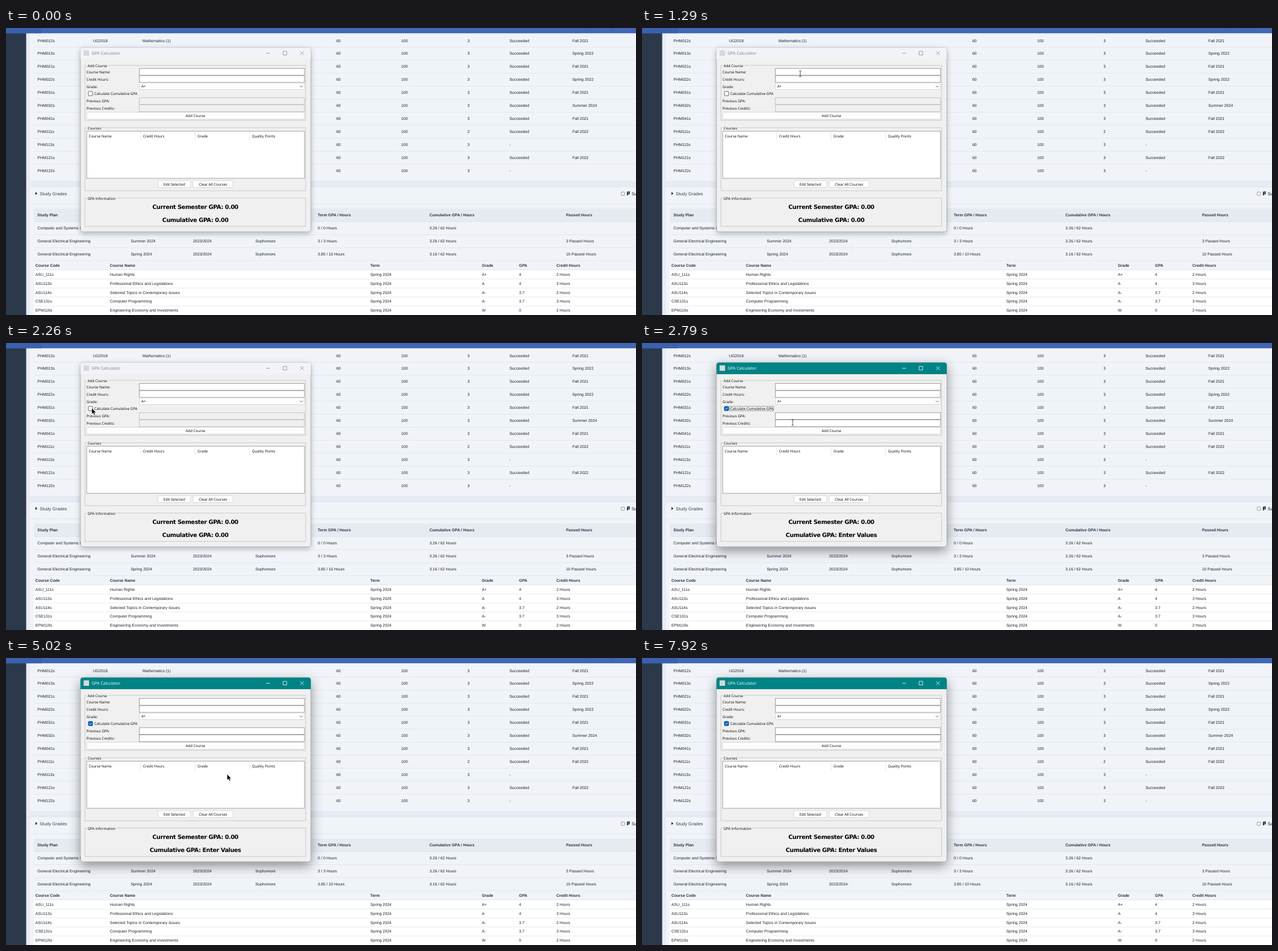
An HTML page for the animation above (8000 ms loop, 1108 px wide and 506 px high).

```html
<!DOCTYPE html>
<html lang="en">
<head>
<meta charset="utf-8">
<title>GPA Calculator</title>
<style>
  html, body { margin: 0; width: 100%; height: 100%; overflow: hidden; background: #e6ebf4; }
  svg { display: block; width: 1108px; height: 506px; }
  text { font: 6.92px "Liberation Sans", Arial, sans-serif; fill: #1c2027; text-rendering: geometricPrecision; white-space: pre; }
  .b { font-weight: bold; fill: #2a323d; }
  .ui { font: 6.35px "Open Sans", "Noto Sans", sans-serif; fill: #000; }
  .title { font: 7.4px "Open Sans", "Noto Sans", sans-serif; }
  .big { font: bold 10.2px "DejaVu Sans", sans-serif; letter-spacing: -0.39px; fill: #000; }
  .mid { text-anchor: middle; }
</style>
</head>
<body>
<svg id="stage" viewBox="0 0 1108 506" xmlns="http://www.w3.org/2000/svg"></svg>
<script>
const LOOP = 8000;
const stage = document.getElementById("stage");

const rect = (x, y, w, h, fill, extra = "") =>
  `<rect x="${x}" y="${y}" width="${w}" height="${h}" fill="${fill}" ${extra}/>`;
const box = (x, y, w, h, fill, stroke, extra = "") =>
  rect(x, y, w, h, fill, `stroke="${stroke}" stroke-width=".8" ${extra}`);
const text = (x, y, s, cls = "", extra = "") =>
  `<text x="${x}" y="${y + 2.5}" class="${cls}" ${extra}>${s}</text>`;
const row = (y, xs, cells, cls) =>
  cells.map((s, i) => s === "" ? "" : text(xs[i], y, s, cls)).join("");
const rule = (y, color = "#dfe4ec") => rect(49, y, 1059, 0.8, color);

function coursePlan() {
  const xs = [55.3, 153, 240, 581, 695, 811.5, 885.5, 996];
  const codes = ["012", "013", "021", "022", "031", "032", "041", "111", "113", "121", "122"];
  const terms = ["Fall 2021", "Spring 2022", "Fall 2021", "Spring 2022", "Fall 2021",
    "Summer 2024", "Fall 2021", "Fall 2022", "", "Fall 2022", ""];
  return codes.map((code, i) => {
    const y = 22 + i * 22.93;
    const cells = [`PHM${code}s`, i ? "" : "UG2018", i ? "" : "Mathematics (1)", "60", "100",
      code === "111" ? "2" : "3", terms[i] ? "Succeeded" : "-", terms[i]];
    return row(y, xs, cells) + (i < 10 ? rule(y + 11.4) : "");
  }).join("");
}

function gradeTables() {
  const xs = [55.3, 219.5, 329, 438.5, 548.3, 744.8, 985];
  const general = "General Electrical Engineering";
  const plan = [
    ["Computer and Systems Engineering", "", "", "", "0 / 0 Hours", "3.26 / 62 Hours", ""],
    [general, "Summer 2024", "2023/2024", "Sophomore", "3 / 3 Hours", "3.26 / 62 Hours", "3 Passed Hours"],
    [general, "Spring 2024", "2023/2024", "Sophomore", "3.85 / 10 Hours", "3.16 / 62 Hours", "10 Passed Hours"]
  ];
  const cx = [51.7, 182.8, 640.7, 837, 902.3, 968];
  const courses = [
    ["ASU_111s", "Human Rights", "A+", "4", "2 Hours"],
    ["ASU113s", "Professional Ethics and Legislations", "A", "4", "3 Hours"],
    ["ASU114s", "Selected Topics in Contemporary Issues", "A-", "3.7", "2 Hours"],
    ["CSE131s", "Computer Programming", "A-", "3.7", "3 Hours"],
    ["EPM119s", "Engineering Economy and Investments", "W", "0", "2 Hours"]
  ];
  return rect(49, 318, 1059, 23.5, "#e6ebf2") +
    row(329.7, xs, ["Study Plan", "", "", "", "Term GPA / Hours", "Cumulative GPA / Hours", "Passed Hours"], "b") +
    plan.map((cells, i) => rule(341 + i * 22.9) + row(352.6 + i * 22.9, xs, cells)).join("") +
    rect(49, 410, 1059, 16.5, "#f0f3f8") + rule(409.6) +
    row(418.6, cx, ["Course Code", "Course Name", "Term", "Grade", "GPA", "Credit Hours"], "b") +
    rect(49, 426.5, 1059, 80, "#fff") +
    courses.map(([code, name, ...rest], i) =>
      rule(426.2 + i * 15.85) + row(434.5 + i * 15.8, cx, [code, name, "Spring 2024", ...rest])).join("");
}

function page() {
  return rect(0, 0, 1108, 506, "#e6ebf4") +
    rect(42, 9, 1066, 262, "#f0f4f9") +
    rect(42, 280, 1066, 226, "#f0f4f9") +
    rect(42, 270.4, 1066, 0.8, "#dce2ea") + rect(42, 279.6, 1066, 0.8, "#dce2ea") +
    rect(42, 309.4, 1066, 0.8, "#dce2ea") +
    rect(0, 9, 35.5, 497, "#2b394b") +
    rect(0, 0, 1108, 9.3, "#4167b5") + rect(0, 0, 63, 9.3, "#3b60ae") +
    rect(1028, 0, 0.7, 7, "#3a5da5") + rect(1065, 0, 0.7, 7, "#3a5da5") +
    coursePlan() + gradeTables() +
    `<path d="M51.8 289l3.4 2.7l-3.4 2.7z" fill="#222"/>` +
    text(59.3, 292, "Study Grades", "", `style="font-size:7.85px;fill:#3a414b"`) +
    box(1082, 289.2, 5.8, 5.8, "#fff", "#777", `rx="1"`) +
    rect(1092, 288.5, 2.2, 6.5, "#26303c") + rect(1094.7, 287.8, 2.2, 5.6, "#26303c") +
    text(1100.3, 292.5, "Su", "", `style="font-size:7.85px"`);
}

function group(y, h, label, width) {
  return box(139.6, y + 0.6, 388, h, "none", "#fff") + box(139, y, 388, h, "none", "#b4b4b4") +
    rect(142, y - 2, width, 4, "#f0f0f0") + text(143.5, y, label, "ui");
}

const button = (x, y, w, label, id = "") =>
  box(x, y, w, 12.3, "#fdfdfd", "#cfcfcf", `rx="1.6" id="${id}"`) +
  text(x + w / 2, y + 6.3, label, "ui mid");
const field = (y, id = "") => box(234.5, y, 290.4, 11.9, "#fff", "#868686", `id="${id}"`);

function appWindow() {
  const labels = ["Course Name:", "Credit Hours:", "Grade:", "", "Previous GPA:", "Previous Credits:"];
  const heads = ["Course Name", "Credit Hours", "Grade", "Quality Points"];
  return rect(131, 34.6, 405, 324.6, "#f0f0f0", `rx="4.5" id="frame" stroke="#9ba3ad" stroke-width=".7"`) +
    `<path id="bar" d="M131 55V39q0-4.4 4.4-4.4H531.600q4.4 0 4.4 4.4V55z"/>` +
    rect(136.500, 39.4, 9.6, 9.6, "#d5d8dd") +
    text(150.4, 44.6, "GPA Calculator", "title", `id="title"`) +
    `<path id="controls" fill="none" stroke-width=".8" d="M457.600 44.500h6.600M487.300 41.200h6.400v6.400h-6.400zM517.400 41.200l6.400 6.400m0-6.400l-6.400 6.400"/>` +
    group(66, 97, "Add Course", 38) +
    labels.map((s, i) => text(141.5, 77.6 + i * 12.75, s, "ui")).join("") +
    field(71.3) + field(84) +
    box(234.5, 97, 290.4, 11.5, "#fff", "#cfcfcf", `rx="1" id="grade"`) +
    text(238, 102.8, "A+", "ui") +
    `<path d="M516.800 101.700l2.600 2.600l2.600-2.600" fill="none" stroke="#444" stroke-width=".8"/>` +
    box(144.800, 111.800, 7.6, 7.6, "#fafafa", "#4a4a55", `rx="1.4" id="check"`) +
    `<path id="tick" d="M146.400 115.600l1.600 1.700l2.900-3.300" fill="none" stroke="#fff" stroke-width=".9"/>` +
    text(155.2, 115.6, "Calculate Cumulative GPA", "ui") +
    box(154, 111.6, 77.4, 8, "none", "#333", `id="focus" stroke-dasharray=".7 .6"`) +
    field(122.9, "prevGpa") + field(135.6, "prevCredits") +
    rect(236.5, 124.4, 0.8, 8.6, "#000", `id="caret"`) +
    button(142, 148.5, 382.5, "Add Course", "add") +
    group(176, 111, "Courses", 26) +
    box(142, 182, 383, 83, "#fff", "#858a92") +
    heads.map((s, i) => text(145.4 + i * 95.7, 190.8, s, "ui") +
      rect(236.3 + i * 95.85, 182.5, 0.7, 15.5, "#dadada")).join("") +
    button(267.2, 269, 57.4, "Edit Selected") + button(329, 269, 70.3, "Clear All Courses") +
    group(300, 50, "GPA Information", 52) +
    text(333, 316.8, "Current Semester GPA: 0.00", "big mid") +
    text(333, 339.8, "", "big mid", `id="cumulative"`);
}

stage.innerHTML = page() + appWindow() +
  `<g id="pointer">
    <path id="arrow" d="M0 0V10.200L2.400 8.100L4 11.600L5.700 10.800L4.200 7.400H7.200z" stroke="#fff" stroke-width=".4"/>
    <path id="beam" d="M-2-5.300Q0-5.300 0-4.300Q0-5.300 2-5.300M0-4.500V4.500M-2 5.300Q0 5.300 0 4.300Q0 5.300 2 5.300" fill="none" stroke="#222" stroke-width=".8"/>
  </g>`;

const el = Object.fromEntries([...stage.querySelectorAll("[id]")].filter(n => n.id).map(n => [n.id, n]));
const set = (node, attrs) => { for (const k in attrs) node.setAttribute(k, attrs[k]); };
const show = (node, on) => set(node, { visibility: on ? "inherit" : "hidden" });
const within = (t, ...spans) => spans.some(([a, b]) => t >= a && t < b);

// Pointer path: time, x, y
const path = [
  [180, 994, 484], [400, 765, 380], [600, 475, 232], [735, 340, 163], [870, 296, 130], [939, 291, 113],
  [1010, 287, 99], [1150, 281, 80], [1400, 276, 81], [1600, 276, 101], [1767, 277, 115],
  [1840, 262, 115.500], [2050, 190, 116], [2250, 151, 115], [2590, 151, 115],
  [2650, 170, 120], [2788, 265, 140], [2950, 268, 129], [3270, 268, 130], [3410, 302, 150],
  [3480, 334, 163], [3560, 360, 190], [3740, 378, 205], [5019, 378, 205],
  [5020, 389, 205], [5200, 560, 284], [5450, 850, 412], [5640, 1028, 486],
  [7230, 916, 470], [7500, 800, 250], [7860, 640, 1]
];
const starts = [180, 1010, 1840, 2650, 3480, 5020, 7230];
const STEP = 69;

function heldTime(t) {
  const start = starts.filter(s => s <= t).pop() ?? 180;
  return start + Math.floor((t - start) / STEP) * STEP;
}

function pointerAt(t) {
  const q = heldTime(t);
  const i = path.findIndex(p => p[0] > q);
  if (i < 0) return path[path.length - 1].slice(1);
  if (i === 0) return path[0].slice(1);
  const [a, b] = [path[i - 1], path[i]];
  const k = (q - a[0]) / (b[0] - a[0]);
  return [a[1] + (b[1] - a[1]) * k, a[2] + (b[2] - a[2]) * k];
}

function hover(node, on) {
  set(node, { fill: on ? "#e0eef9" : "#fdfdfd", stroke: on ? "#0078d4" : "#cfcfcf" });
}

function render(t) {
  const active = t >= 2320;
  const checked = t >= 2390;
  const onGrade = within(t, [1010, 1079], [1560, 1840]);
  set(el.bar, { fill: active ? "#008385" : "#f2f3f7" });
  el.title.style.fill = active ? "#fff" : "#7d7f85";
  set(el.controls, { stroke: active ? "#fff" : "#85878c" });
  el.frame.style.filter = active
    ? "drop-shadow(0 7px 10px rgba(0,0,0,.42))"
    : "drop-shadow(0 3px 5px rgba(0,0,0,.26))";

  set(el.check, { fill: checked ? "#0061b8" : "#fafafa", stroke: checked ? "#0061b8" : "#4a4a55" });
  show(el.tick, checked);
  show(el.focus, within(t, [2320, 3090]));
  for (const f of [el.prevGpa, el.prevCredits])
    set(f, { fill: checked ? "#fff" : "#f0f0f0", stroke: checked ? "#868686" : "#b8b8b8" });
  el.cumulative.textContent = "Cumulative GPA: " + (checked ? "Enter Values" : "0.00");
  show(el.caret, within(t, [3090, 3620], [4150, 4680], [5210, 5700], [6230, 6700], [7230, 7760]));
  hover(el.add, within(t, [800, 1010], [3480, 3617]));
  hover(el.grade, onGrade);

  const [x, y] = pointerAt(t);
  const beam = within(t, [1079, 1560], [2780, 3340]);
  set(el.pointer, { transform: `translate(${x} ${y})` });
  show(el.pointer, within(t, [180, 5700], [7230, 7920]));
  show(el.arrow, !beam);
  show(el.beam, beam);
  set(el.arrow, { fill: onGrade ? "#0b3a66" : "#000" });
}

function tick() {
  render(performance.now() % LOOP);
  requestAnimationFrame(tick);
}
tick();
</script>
</body>
</html>
```
